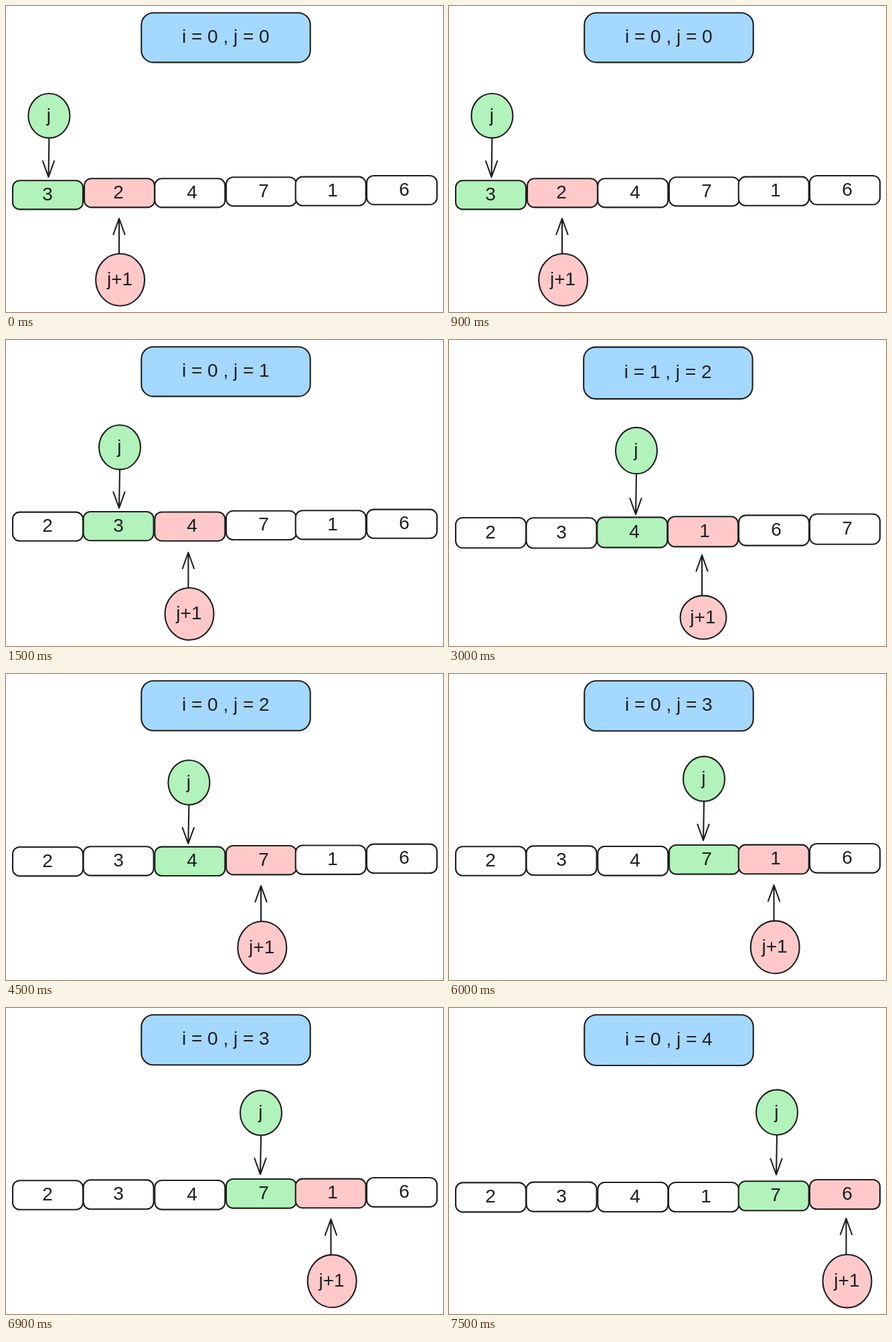
An HTML page that plays this animation: 653 by 458 pixels, repeating every 8000 ms.

```html
<!DOCTYPE html>
<html lang="en">
<head>
<meta charset="utf-8">
<title>Bubble sort steps</title>
<style>
  html, body { margin: 0; width: 100%; height: 100%; overflow: hidden; background: #fff; }
  svg { display: block; stroke: #1e1e1e; stroke-width: 2.1; stroke-linecap: round; stroke-linejoin: round; fill: none; }
  text { font: 28px "Liberation Sans", Arial, sans-serif; text-anchor: middle; fill: #1e1e1e; stroke: none; white-space: pre; }
</style>
</head>
<body>
<svg id="stage" width="653" height="458" viewBox="0 0 653 458"></svg>
<script>
const BLUE = '#a5d8ff', GREEN = '#b2f2bb', PINK = '#ffc9c9';
const LOOP = 8000, STEP = 1500, CELL_WIDTH = 105;

// title: [x, y, height]; pointers: [cx, cy, rx, ry, arrow x, arrow tip y]
const steps = [
  { i: 0, j: 0, values: '324716', title: [202.3, 10.2, 74.2], height: 43.2,
    lefts: [10, 117, 222.3, 329, 432.7, 539], tops: [261.2, 258.2, 258.2, 256.2, 255.6, 254],
    upper: [64.4, 164.3, 31, 33.3, 63.5, 256], lower: [170.6, 409.8, 36.5, 39, 169, 318] },
  { i: 0, j: 1, values: '234716', title: [202.3, 10.2, 74.2], height: 43.2,
    tops: [257.6, 257, 257.5, 255.8, 255.2, 253.6],
    upper: [170, 160.6, 31, 33.3, 169, 251.5], lower: [274, 410, 36.5, 39, 272.4, 318] },
  { i: 1, j: 2, values: '234167', title: [201.2, 10.6, 77.5], height: 45.2,
    lefts: [10, 115.5, 221.3, 327, 433, 539], tops: [266, 266.3, 265.4, 264.2, 262.4, 260.5],
    centers: [62, 168, 277, 382, 489, 595],
    upper: [280, 165.6, 31, 34.7, 279, 261], lower: [380, 415.2, 34.4, 32.6, 378, 322] },
  { i: 0, j: 2, values: '234716', title: [202.3, 10.2, 74.5], height: 43.4,
    tops: [259, 258.2, 258.6, 257, 256.5, 254.6],
    upper: [273.4, 162.4, 31, 33.4, 272.3, 254], lower: [382.8, 409.5, 36.5, 39.2, 381, 317] },
  { i: 0, j: 3, values: '234716', title: [202.3, 10.2, 75], height: 43.6,
    tops: [258.2, 257.4, 258, 256, 255.6, 254],
    upper: [381, 157, 31, 33.6, 380, 249], lower: [487.2, 408.8, 36.5, 39.4, 485.5, 316] },
  { i: 0, j: 4, values: '234176', title: [202.3, 10.2, 75.8], height: 44,
    lefts: [10, 115.6, 222.3, 328, 432.7, 539], tops: [261.4, 260.6, 261, 261, 259.3, 257],
    centers: [62, 168, 278, 384, 488, 595],
    upper: [490, 156.2, 31, 33.8, 489, 249.5], lower: [595, 408.8, 36.5, 39.8, 593.5, 315] },
];
const usualLefts = [10, 115.6, 222.3, 329, 432.7, 539];
const usualCenters = [62, 168, 278, 385, 488, 595];

const box = (x, y, w, h, r, fill) =>
  `<rect x="${x}" y="${y}" width="${w}" height="${h}" rx="${r}" fill="${fill}"/>`;
const label = (x, y, content) => `<text x="${x}" y="${y}">${content}</text>`;

function pointer([cx, cy, rx, ry, x, tip], name, fill, down) {
  const start = cy + down * ry, wing = tip - down * 24;
  return `<ellipse cx="${cx}" cy="${cy}" rx="${rx}" ry="${ry}" fill="${fill}"/>` +
    `<path d="M${down > 0 ? cx : x} ${start}L${x} ${tip}M${x - 8.6} ${wing}L${x} ${tip}L${x + 8.6} ${wing}"/>` +
    label(cx - 0.6, cy + 8.4, name);
}

function drawStep(step) {
  const { i, j, values, title: [x, y, h], height, tops } = step;
  const lefts = step.lefts || usualLefts, centers = step.centers || usualCenters;
  const cells = [...values].map((value, k) => {
    const fill = k === j ? GREEN : k === j + 1 ? PINK : '#fff';
    return box(lefts[k], tops[k], CELL_WIDTH, height, 10.5, fill) +
      label(centers[k], tops[k] + height * 0.465 + 9.6, value);
  });
  return box(x, y, 252.4, h, 18, BLUE) +
    label(x + 126, y + h / 2 + 7.6, `i = ${i} , j = ${j}`) + cells.join('') +
    pointer(step.upper, 'j', GREEN, 1) + pointer(step.lower, 'j+1', PINK, -1);
}

const stage = document.getElementById('stage');
let shown = -1;
function render() {
  const current = Math.floor(performance.now() % LOOP / STEP);
  if (current !== shown) {
    shown = current;
    stage.innerHTML = drawStep(steps[current]);
  }
  requestAnimationFrame(render);
}
render();
</script>
</body>
</html>
```
